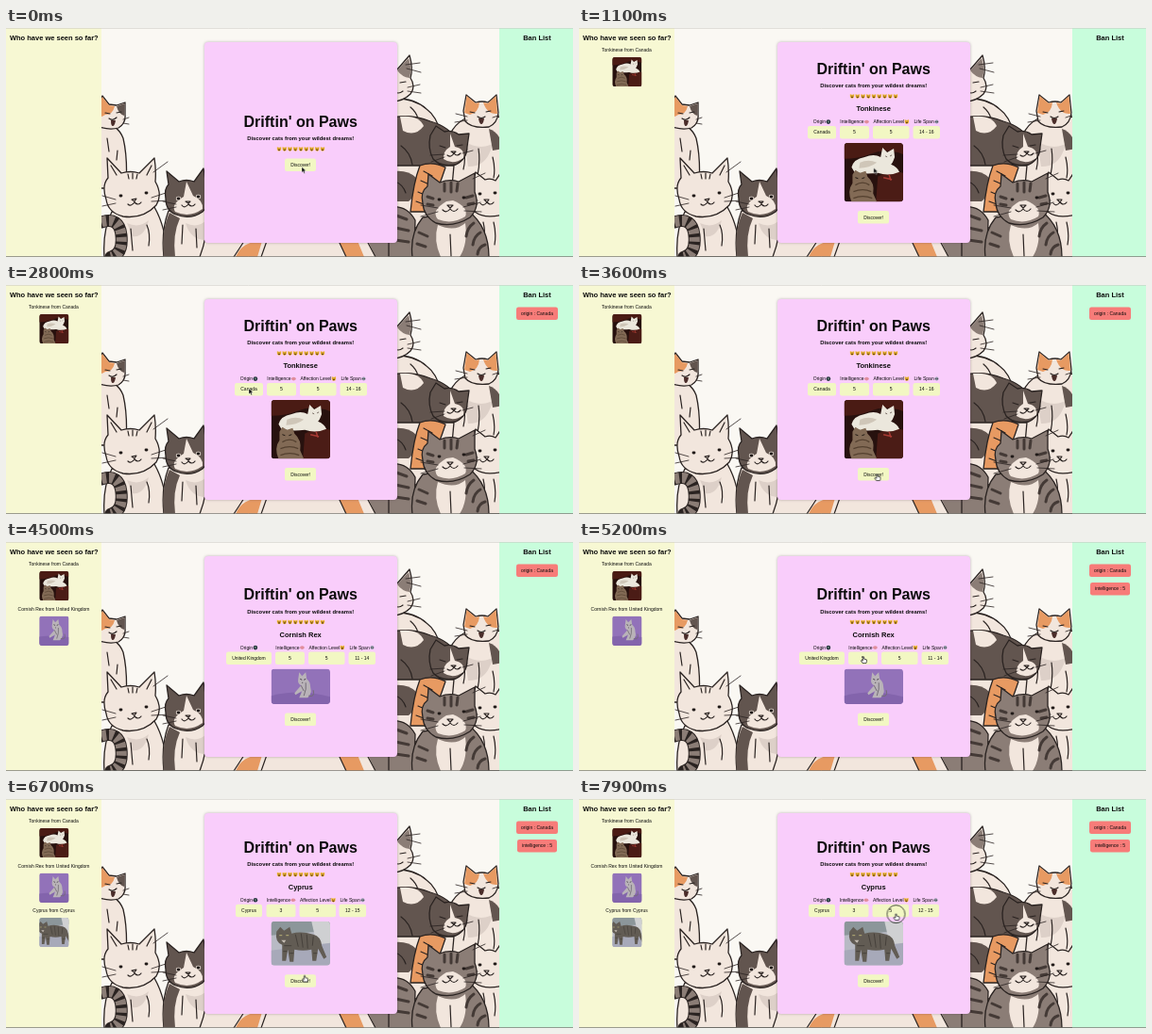
An HTML page for the animation above (8 s loop, 600 px wide and 243 px high).

```html
<!DOCTYPE html>
<html lang="en">
<head>
<meta charset="utf-8">
<title>Driftin' on Paws</title>
<style>
html, body { margin: 0; width: 100%; height: 100%; overflow: hidden; background: #faf8f3; }
svg { display: block; }
#stage { width: 600px; height: 243px; }
text { font-family: "Liberation Sans", Arial, sans-serif; text-anchor: middle; fill: #0b0b0b; }
.b { font-weight: bold; }
.end { text-anchor: end; }
.card { fill: #f9cdfb; filter: drop-shadow(0 0 1.5px rgba(70, 40, 70, .35)); }
.pill { fill: #f2f7c3; }
.ban { fill: #f77c79; }
.cats path { stroke-linejoin: round; stroke-linecap: round; }
.cats .c, .cats .g, .cats .o, .cats .t { stroke: #2a2321; stroke-width: 1.3; }
.c { fill: #f2e6dd; }
.g { fill: #62554f; }
.o { fill: #e79a62; }
.t { fill: #8b7d76; }
.shade { fill: #ddd0c8; }
.cats .p { stroke: none; }
.cats .l { fill: none; stroke: #2a2321; stroke-width: 1.2; }
.cats .thin { fill: none; stroke: #2a2321; stroke-width: .8; }
.cats .stripe { fill: none; stroke: #443a36; stroke-width: 3; }
.cats .eye { stroke: #211b19; stroke-width: 2.8; }
#cursor { animation: move 8s infinite ease-in-out; }
</style>
</head>
<body>
<svg id="stage" viewBox="0 0 600 243">
  <defs>
    <clipPath id="middle"><rect x="101" width="421" height="243"/></clipPath>
    <symbol id="face" viewBox="-3 -3 6 6">
      <path d="M-2.3-.2L-2.2-2.6L-.8-1.9H.8L2.2-2.6L2.3-.2Q2.4 2.3 0 2.3T-2.3-.2Z" fill="#f0b735"/>
      <path d="M-1.4-.5h.9M.5-.5h.9M-1 .8Q0 2 1 .8Z" stroke="#4a3010" stroke-width=".6" fill="#6d3515"/>
    </symbol>
    <symbol id="tonkinese" viewBox="0 0 63 63" preserveAspectRatio="xMidYMid slice">
      <path d="M0 0H63V63H0Z" fill="#27110e"/>
      <path d="M0 0H63V12Q45 5 30 11T0 17Z" fill="#4a1b14"/>
      <path d="M36 36Q50 28 63 32V63H34Z" fill="#4b1c16"/>
      <path d="M8 26Q10 17 22 15Q32 11 39 15L41 5L46 10L53 6L54 15Q52 21 50 23Q57 26 59 31Q48 36 36 32Q22 34 11 31Z" fill="#ebe7dc"/>
      <path d="M17 21Q26 17 35 21Q27 27 16 27Z" fill="#cfc6b8"/>
      <path d="M44 14l2 1M49 14l2-1" stroke="#766a62"/>
      <path d="M9 34L12 29L17 32L23 30L25 36Q33 43 31 54L35 63H8Q3 51 9 43Z" fill="#826a55"/>
      <path d="M12 45q8-5 15 0M10 52q10-4 19 0M10 59q10-4 20 0" stroke="#54402f" stroke-width="1.3" fill="none"/>
      <path d="M12 37l3 1M19 38l3-1" stroke="#211914"/>
      <path d="M42 37l9 2M48 34l2 6" stroke="#a83a33" stroke-width="1.5"/>
    </symbol>
    <symbol id="cornish" viewBox="0 0 63 38" preserveAspectRatio="xMidYMid slice">
      <path d="M0 0H63V38H0Z" fill="#9272b9"/>
      <path d="M0 29Q30 21 63 30V38H0Z" fill="#8364ac"/>
      <path d="M30 4L33 8L37 4L38 11Q42 14 42 20Q44 27 39 31H30L33 24L26 28L25 26L32 18Q28 16 29 11Z" fill="#b9b3b8"/>
      <path d="M37 15Q38 22 35 29M32 18l3 6M40 29Q47 31 45 23" stroke="#736c75" fill="none"/>
      <path d="M31 11l2 1M35 12l2-1M33 15h1" stroke="#453e47"/>
    </symbol>
    <symbol id="cyprus" viewBox="0 0 63 47" preserveAspectRatio="xMidYMid slice">
      <path d="M0 0H63V47H0Z" fill="#b8bac4"/>
      <path d="M0 0H63V10L0 15Z" fill="#8c969a"/>
      <path d="M43 0H63V27L48 22Z" fill="#cfd0d2"/>
      <path d="M0 31L63 23V47H0Z" fill="#a7a9b9"/>
      <path d="M6 11L10 6L14 10L20 6L22 13Q32 10 45 14Q53 16 54 26L59 38L56 40L50 29L48 42H44L43 30Q34 32 25 30L24 43H20L18 30L16 42H12L12 25Q4 22 6 11Z" fill="#625c54"/>
      <path d="M26 14l3 13M32 13l2 15M38 14l1 15M45 16l-1 10M14 26h8M13 32h4M20 34h4M45 34h4" stroke="#46413b"/>
      <path d="M9 15h3M16 15h3" stroke="#b9b177"/>
      <path d="M11 20h5l-2 3Z" fill="#c5bdb3"/>
    </symbol>
  </defs>

  <rect width="600" height="243" fill="#faf8f3"/>
  <g class="cats" clip-path="url(#middle)">
    <!-- backs below the card -->
    <path class="c p" d="M200 226H420V243H200Z"/>
    <path class="o p" d="M243 243Q250 226 271 226L266 243ZM352 226H372L379 243H360Z"/>
    <path class="t p" d="M383 226H420V243H391Z"/>
    <path class="l" d="M241 243Q249 231 252 226M276 226L270 243M352 226L360 243M382 226L391 243"/>
    <!-- calico, far left -->
    <path class="c" d="M98 100Q118 101 124 117Q129 138 127 170H98Z"/>
    <path class="c" d="M96 84L102 72L109 81L117 82L126 79L126 92Q127 101 119 106Q109 109 96 104Z"/>
    <path class="o p" d="M97 84L102 73L109 82L115 83Q113 92 105 92Q101 95 97 94Z"/>
    <path class="g p" d="M117 83L125.5 80L125 93Q119 91 117 83Z"/>
    <path class="l" d="M105 90l5 1M117 90l5-1M109 96q4 3 8-1M107 117l2 14M118 130l-1 10"/>
    <path d="M111 98h5q-1 6-3 6t-2-6Z" fill="#4a2c29"/>
    <path class="thin" d="M124 97l6-2M124 101l6 1"/>
    <!-- white cat -->
    <path class="c" d="M112 195Q102 215 104 243H170Q170 213 157 190Z"/>
    <path class="shade p" d="M128 207Q141 213 151 204Q146 223 134 221Z"/>
    <path class="c" d="M106 182Q101 167 108 159L107 138L122 154Q132 151 141 154L157 138Q159 150 158 163Q166 177 159 188Q145 203 124 200Q108 196 106 182Z"/>
    <path class="l" d="M111 146l6 10M154 146l-5 10M133 182l5-1l-2 3ZM136 185q-4 5-7 2M136 185q4 4 7 0M129 155l1 5M134 154v6M139 155l-1 5M132 213l2 23M149 209q4 9 2 22"/>
    <path class="thin" d="M116 182L102 178M116 186L102 189M154 180L172 174M154 184L173 183M156 153L171 142"/>
    <path class="eye" d="M121 178h1M148 175h1"/>
    <path class="l" d="M101 206Q120 200 122 220T111 243" style="stroke-width:13"/>
    <path class="l" d="M101 206Q120 200 122 220T111 243" style="stroke:#8b7d76;stroke-width:11;stroke-dasharray:5 3;stroke-linecap:butt"/>
    <!-- tuxedo cat -->
    <path class="c" d="M172 194Q164 215 167 243H205Q214 220 213 192Z"/>
    <path class="g p" d="M173 196Q164 215 167 243H179Q176 219 184 202Z"/>
    <path class="shade p" d="M190 207Q203 213 212 204V225Q195 225 190 207Z"/>
    <path class="g" d="M169 181Q167 171 172 166L170 152L183 163Q191 160 199 163L209 149L212 168Q218 185 208 195Q195 204 180 198Q169 194 169 181Z"/>
    <path class="c p" d="M191 163L198 178Q209 183 208 192Q194 202 179 195Q174 187 188 179Z"/>
    <path class="l" d="M190 184h5l-2 2ZM193 187q-4 5-7 1M193 187q4 4 7 0M187 209l-1 20M201 213l1 20"/>
    <path class="thin" d="M180 187L166 184M180 190L166 193"/>
    <path class="eye" d="M182 181h1M203 179h1" style="stroke:#f2e6dd;stroke-width:4.5"/>
    <path class="eye" d="M182 181h1M203 179h1"/>
    <!-- cat peeking over the card -->
    <path class="c" d="M405 75Q431 73 445 86Q456 94 460 112H405Z"/>
    <path class="c" d="M405 48L414 44L427 29Q431 43 428 53Q434 62 428 70Q419 79 405 78Z"/>
    <path class="t p" d="M414 45L426 32Q430 44 427 53Q419 52 414 45Z"/>
    <path class="l" d="M417 58l6-1M410 67q5 4 10 0M428 84q6 5 8 12"/>
    <path class="thin" d="M423 39l15-2M424 43l15 4M425 63l13-3M425 67l14 2"/>
    <!-- resting calico, right -->
    <path class="c" d="M486 96Q463 108 464 146V185H527V94Z"/>
    <path class="shade p" d="M485 120Q500 130 515 123Q509 148 489 147Z"/>
    <path class="g p" d="M511 107Q522 110 527 128L515 130Z"/>
    <path class="c" d="M484 88L487 71L497 79Q504 77 510 79L519 71L521 90Q520 101 511 105Q493 107 486 99Z"/>
    <path class="o p" d="M485 90L487.5 72L497 80L501 79Q500 90 491 92Z"/>
    <path class="o p" d="M505 79L510 80L518.5 72L520 91Q509 92 505 79Z"/>
    <path class="l" d="M491 89l5 1M508 89l5-1M499 94q4 3 8 0M481 120q7 13 3 30M500 128q2 14-1 28M515 137q3 12 1 22"/>
    <path d="M500 96h6q-1 6-3 6t-3-6Z" fill="#4a2c29"/>
    <path class="thin" d="M488 94l-12-3M488 98l-13 2M515 95l9-3"/>
    <!-- brown cat leaning over -->
    <path class="g" d="M405 96Q426 90 449 99Q470 105 476 119Q472 145 447 148H405Z"/>
    <path class="c p" d="M417 94Q437 92 442 104Q433 116 420 109Z"/>
    <path class="g" d="M449 114L455 104L464 110Q472 108 479 113L490 112L488 126Q488 139 476 145Q460 148 452 139Q446 128 449 114Z"/>
    <path class="c p" d="M470 112L475 126Q486 128 484 138Q473 146 463 139Q462 131 470 126Z"/>
    <path class="l" d="M459 125l6 2M477 125l6-1M471 131h5l-2 2ZM474 133q-3 5-7 2M474 133q3 4 7 0M418 125q10 7 12 20"/>
    <path class="thin" d="M464 134l-15 1M464 137l-14 5M483 133l11-3"/>
    <!-- orange and cream cat between -->
    <path class="c" d="M405 146H474L468 212H405Z"/>
    <path class="g p" d="M405 153Q424 149 434 159Q436 176 426 184H405Z"/>
    <path class="o" d="M438 146Q451 141 465 148Q458 170 446 195H428Q431 164 438 146Z"/>
    <path class="l" d="M442 152l9 5M439 162l9 4M436 174l9 4M434 184l8 3M412 163q8 3 11 12"/>
    <!-- white cat, right -->
    <path class="c" d="M494 190Q489 218 493 243H530V180Z"/>
    <path class="c" d="M489 179Q488 169 494 163L497 153L507 161Q513 159 518 162L526 150V198Q507 203 496 195Q489 190 489 179Z"/>
    <path class="l" d="M506 182h5l-2 3ZM509 185q-4 5-7 1M509 185q4 4 7 0M505 206q3 12 0 25M516 206q3 12 1 24"/>
    <path class="thin" d="M499 183l-13-4M499 187l-13 3"/>
    <path class="eye" d="M501 176h1M517 175h1"/>
    <!-- grey tabby -->
    <path class="t" d="M405 190Q424 187 433 204L432 243H405Z"/>
    <path class="t" d="M441 201Q427 218 430 243H511Q511 211 489 194Z"/>
    <path class="c p" d="M457 209Q475 217 486 207Q489 229 480 243H460Q452 225 457 209Z"/>
    <path class="t" d="M441 186Q438 174 446 168L447 155L459 164Q469 160 479 163L496 154L496 174Q502 190 491 201Q474 212 455 207Q442 200 441 186Z"/>
    <path class="c p" d="M466 184L473 183Q490 190 486 200Q472 209 457 203Q449 194 466 184Z"/>
    <path class="stripe" d="M464 165v8M471 164v10M478 165l-1 8M446 179l6 2M446 187l6 1M494 178l-7 2M495 186l-6 1M495 207q-7 5-8 14M502 217q-7 4-8 13M507 230q-7 2-8 10M437 217l9 4M435 229l9 3M413 199l11 4M412 212l14 3M412 225l14 2"/>
    <path class="l" d="M467 188h6l-3 3ZM470 192q-4 5-8 1M470 192q4 5 8 0M470 219l1 23"/>
    <path class="thin" d="M457 191l-18-3M457 195l-18 5M484 190l18-5M485 194l18 1M494 160l13-6"/>
    <path class="eye" d="M458 182h1M484 180h1"/>
  </g>

  <rect width="101" height="243" fill="#f7f8d3"/>
  <rect x="522" width="78" height="243" fill="#c8fddc"/>
  <rect class="card" x="210" y="15" width="204" height="213" rx="4"/>
  <g id="ui"></g>
  <path d="M0 .3H600" stroke="#c4c3bc" stroke-width=".6"/>
  <path d="M0 242.6H600" stroke="#777671" stroke-width=".8"/>

  <g id="cursor">
    <path class="arrow" d="M0 0V5.8L1.4 4.6L2.4 6.8L3.5 6.3L2.5 4.2L4.3 4Z" fill="#000" stroke="#fff" stroke-width=".4"/>
    <path class="hand" d="M-.7.2Q0-.5.7.2V2.2L3.3 2.8Q3.9 4.5 2.9 6.6H-.9L-2.6 3.9L-1.9 3.3L-.7 4.2Z" fill="#fff" stroke="#111" stroke-width=".7"/>
    <circle class="click" cx="0" cy=".2" r="9.5" fill="none" stroke="#222" stroke-width=".8"/>
  </g>
</svg>
<script>
const LOOP = 8000;
const FIRST = 900, SECOND = 4100, THIRD = 6500;
const pct = ms => ms / LOOP * 100 + '%';
let css = '', clips = 0;

// Toggle times alternate between on and off.
function show(name, ...times) {
  const steps = times.map((ms, i) => `${pct(ms)}{opacity:${1 - i % 2}}`).join('');
  css += `@keyframes ${name}{0%{opacity:0}${steps}}.${name}{animation:${name} 8s step-end infinite}`;
}

const text = (x, y, size, str, cls = '') =>
  `<text x="${x}" y="${y}" font-size="${size}" class="${cls}">${str}</text>`;
const box = (cls, x, y, w, h = 13.5) =>
  `<rect class="${cls}" x="${x}" y="${y}" width="${w}" height="${h}" rx="2.2"/>`;
const face = (x, y) => `<use href="#face" x="${x - 2.9}" y="${y - 2.9}" width="5.8" height="5.8"/>`;

function photo(id, x, y, w, h, r) {
  const clip = 'clip' + clips++;
  return `<clipPath id="${clip}"><rect x="${x}" y="${y}" width="${w}" height="${h}" rx="${r}"/></clipPath>
    <g clip-path="url(#${clip})"><use href="#${id}" x="${x}" y="${y}" width="${w}" height="${h}"/></g>`;
}

const icons = [
  (x, y) => `<circle cx="${x}" cy="${y}" r="2.3" fill="#24343c"/><path d="M${x - 1} ${y - 1}l2 .4l-1 1.8Z" fill="#8fae9b"/>`,
  (x, y) => `<ellipse cx="${x}" cy="${y}" rx="2.4" ry="1.8" fill="#e08d9c"/>`,
  face,
  (x, y) => `<circle cx="${x}" cy="${y}" r="2" fill="#8f96a5"/><path d="M${x - 1.2} ${y}h.8m.8 0h.8" stroke="#222"/>`
];
const labels = [['Origin', 19], ['Intelligence', 31], ['Affection Level', 38.5], ['Life Span', 26.7]];

// Places are relative to the middle of the title.
function screen(cls, top, cat) {
  let out = text(311.7, 5.8, 16, "Driftin' on Paws", 'b')
    + text(311.7, 20, 5.86, 'Discover cats from your wildest dreams!', 'b');
  for (let i = 0; i < 9; i++) out += face(289 + i * 5.75, 29.5);
  let button = 39.5;
  if (cat) {
    out += text(311.7, 45, 7.5, cat.name, 'b');
    cat.values.forEach((value, i) => {
      const [left, width] = cat.pills[i], mid = left + width / 2;
      const [label, span] = labels[i], right = mid + span / 2;
      out += text(right - 5.4, 58.3, 5, label, 'end') + icons[i](right - 2.6, 56.6)
        + box('pill', left, 61, width) + text(mid, 69.4, 5, value);
    });
    out += photo(cat.id, 280.5, 79, 62.5, cat.height, 4);
    button = 88.6 + cat.height;
  }
  out += box('pill', 295, button, 33) + text(311.6, button + 8.5, 5, 'Discover!');
  return `<g class="${cls}"><g transform="translate(0 ${top})">${out}</g></g>`;
}

const seen = (cls, y, str, id) =>
  `<g class="${cls}">${text(50.5, y, 5, str)}${photo(id, 35.2, y + 5.8, 31.3, 31.3, 3)}</g>`;
const ban = (cls, x, y, w, str) =>
  `<g class="${cls}">${box('ban', x, y, w)}${text(562, y + 8.4, 5, str)}</g>`;

document.getElementById('ui').innerHTML =
  text(50.8, 13, 7.5, 'Who have we seen so far?', 'b') + text(562, 13, 7.5, 'Ban List', 'b')
  + screen('intro', 99)
  + screen('cat1', 43, {
    name: 'Tonkinese', id: 'tonkinese', height: 62.5,
    values: ['Canada', 5, 5, '14 - 16'], pills: [[242, 30], [276, 31], [311, 38.5], [353.5, 28.5]]
  })
  + screen('cat2', 55.5, {
    name: 'Cornish Rex', id: 'cornish', height: 37.5,
    values: ['United Kingdom', 5, 5, '11 - 14'], pills: [[233, 48], [285, 31], [320, 38.5], [362.5, 28.5]]
  })
  + screen('cat3', 50.7, {
    name: 'Cyprus', id: 'cyprus', height: 47,
    values: ['Cyprus', 3, 5, '12 - 15'], pills: [[243, 28], [275.5, 31], [310.5, 38.5], [352.5, 28.5]]
  })
  + seen('seen1', 25.2, 'Tonkinese from Canada', 'tonkinese')
  + seen('seen2', 72.8, 'Cornish Rex from United Kingdom', 'cornish')
  + seen('seen3', 120.2, 'Cyprus from Cyprus', 'cyprus')
  + ban('ban1', 540, 23.5, 44, 'origin : Canada')
  + ban('ban2', 541, 43, 42, 'intelligence : 5');

show('intro', 0, FIRST);
show('cat1', FIRST, SECOND);
show('cat2', SECOND, THIRD);
show('cat3', THIRD, LOOP);
show('seen1', FIRST, LOOP);
show('seen2', SECOND, LOOP);
show('seen3', THIRD, LOOP);
show('ban1', 2600, LOOP);
show('ban2', 5200, LOOP);
show('arrow', 0, 2200, 2800, 3400, 4150, 4400, 4600, 4800, 5300, 5700, 6800, 7500);
show('hand', 2200, 2800, 3400, 4150, 4800, 5300, 5700, 6800, 7500, LOOP);
show('click', 2450, 2600, 3700, 3850, 5050, 5200, 6150, 6300, 7800, LOOP);

const path = [
  [0, 313, 147.5], [1000, 313, 149], [1950, 259.5, 124], [2050, 259.5, 124], [2350, 257, 110],
  [2800, 257, 110], [3500, 315.5, 201], [4150, 315.5, 201], [4500, 316, 147], [4900, 301, 122],
  [5250, 301, 122], [5850, 314.5, 185], [6400, 314.5, 185], [6700, 316, 187.5], [7000, 316, 187.5],
  [7750, 335.5, 122], [LOOP, 335.5, 122]
];
css += '@keyframes move{' + path.map(([ms, x, y]) =>
  `${pct(ms)}{transform:translate(${x}px,${y}px)}`).join('') + '}';
document.head.appendChild(document.createElement('style')).textContent = css;
</script>
</body>
</html>
```
